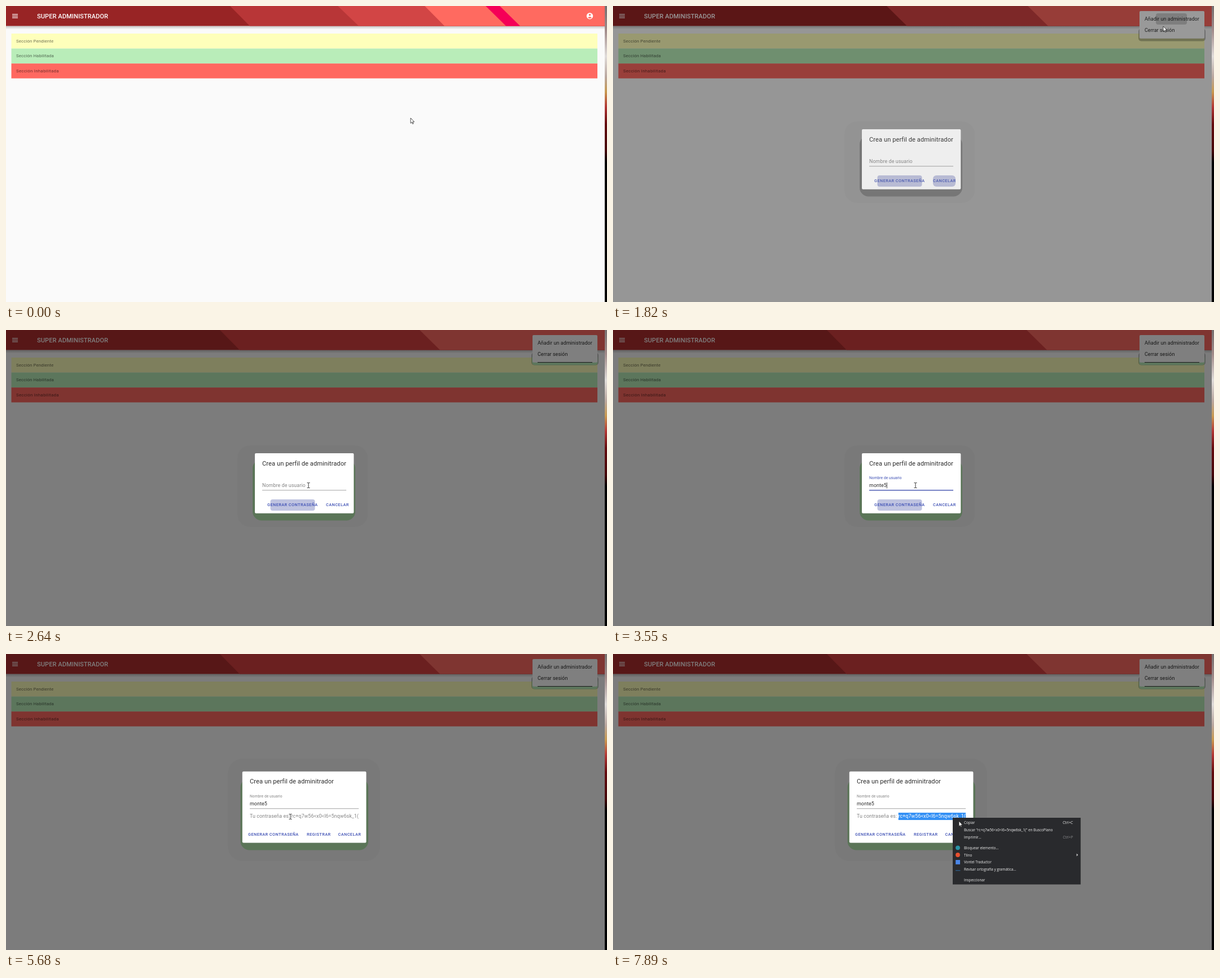
Recreate the animation shown at these times as an HTML page. Size 1065 by 526 pixels, loop 7990 ms.

```html
<!DOCTYPE html>
<html lang="es">
<head>
<meta charset="utf-8">
<title>Panel de administración</title>
<style>
html, body { margin: 0; width: 100%; height: 100%; overflow: hidden; background: #fafafa; }
svg { display: block; width: 1065px; height: 526px; font: 8.88px Roboto, sans-serif; letter-spacing: .083px; }

.title { font-size: 11.1px; font-weight: 500; letter-spacing: .05px; fill: #fff; }
.row { font-size: 7.77px; letter-spacing: .13px; fill: #000; fill-opacity: .56; }
.wide { letter-spacing: .3px; }
.ink { fill: #2b2b2b; }
.soft { fill: #858585; }
.head { font-size: 11.1px; letter-spacing: .08px; fill: #2b2b2b; }
.small { font-size: 6.66px; letter-spacing: .06px; }
.btn { font-size: 7.3px; font-weight: 500; letter-spacing: .45px; fill: #3f51b5; }
.blue { fill: #3f51b5; }
.glow { fill: #bfc3e0; }
.ctx { font: 6.3px "Open Sans", sans-serif; letter-spacing: 0; fill: #f1f1f1; }
.key { text-anchor: end; fill: #8d8e90; }

/* One shared loop; every track changes in hard steps. */
.a { animation: 7990ms step-end infinite both; }
.lit { animation-name: lit; }
.mid { animation-name: mid; }
.dim { animation-name: dim; }
.scrim { animation-name: scrim; }
.menu { animation-name: menu; transform-origin: 1040px 12px; }
.pink { animation-name: pink; }
.hover { animation-name: hover; }
.press { animation-name: mid; }
.rule { animation-name: rule; }
.ask { animation-name: ask; }
.result { animation-name: result; }
.shade { animation-name: shade; }
.cancel { animation-name: cancel; }
.idle { animation-name: idle; }
.focus { animation-name: focus; }
.bar { animation-name: bar; transform-origin: 528.5px 284px; }
.typed tspan { animation-name: typed; animation-delay: calc(var(--i) * 101ms); }
.caret { animation-name: caret; }
.sel { animation-name: sel; transform-origin: 505.5px 288px; }
.context { animation-name: context; }
.copy { animation-name: copy; }
.pointer { animation-name: move; }
.arrow { animation-name: arrow; }
.beam { animation-name: beam; }

@keyframes lit { 0% { opacity: 1 } 22.7%, 100% { opacity: 0 } }
@keyframes mid { 0% { opacity: 0 } 22.7% { opacity: 1 } 24%, 100% { opacity: 0 } }
@keyframes dim { 0% { opacity: 0 } 24%, 100% { opacity: 1 } }
@keyframes scrim { 0% { opacity: 0 } 22.7% { opacity: .4 } 24%, 100% { opacity: .5 } }
@keyframes menu {
  0% { opacity: 0; transform: scale(.4) }
  16.5% { opacity: .6; transform: scale(.7) }
  17.7%, 100% { opacity: 1; transform: none }
}
@keyframes pink { 0% { opacity: 0 } 17.7% { opacity: 1 } 22.7%, 100% { opacity: 0 } }
@keyframes hover { 0% { opacity: 0 } 20.2% { opacity: 1 } 22.7%, 100% { opacity: 0 } }
@keyframes rule { 0% { opacity: 0 } 33%, 100% { opacity: 1 } }
@keyframes ask { 0% { opacity: 0 } 22.7% { opacity: .84 } 24% { opacity: 1 } 59.4%, 100% { opacity: 0 } }
@keyframes result { 0% { opacity: 0 } 59.4%, 100% { opacity: 1 } }
@keyframes shade { 0% { fill: #707070 } 24%, 100% { fill: #5b7558 } }
@keyframes cancel { 0% { opacity: 1 } 27.8%, 100% { opacity: 0 } }
@keyframes idle { 0% { opacity: 1 } 35.5%, 100% { opacity: 0 } }
@keyframes focus { 0% { opacity: 0 } 35.5%, 100% { opacity: 1 } }
@keyframes bar {
  0% { transform: scaleX(0) }
  35.5% { transform: scaleX(.3) }
  36.7% { transform: scaleX(.8) }
  38%, 100% { transform: none }
}
@keyframes typed { 0% { opacity: 0; visibility: hidden } 38%, 100% { opacity: 1; visibility: visible } }
@keyframes caret {
  0% { opacity: 0; transform: none }
  35.5% { opacity: 1; transform: none }
  38% { opacity: 1; transform: translateX(7.9px) }
  39.3% { opacity: 1; transform: translateX(13px) }
  40.5% { opacity: 1; transform: translateX(18px) }
  41.8% { opacity: 1; transform: translateX(21px) }
  43.1% { opacity: 1; transform: translateX(25.8px) }
  44.3% { opacity: 1; transform: translateX(30.9px) }
  50.6%, 100% { opacity: 0; transform: translateX(30.9px) }
}
@keyframes sel {
  0% { transform: scaleX(0) }
  75.9% { transform: scaleX(0); animation-timing-function: steps(8) }
  86.2%, 100% { transform: scaleX(1) }
}
@keyframes context { 0% { opacity: 0 } 92.4%, 100% { opacity: 1 } }
@keyframes copy { 0% { fill: #8d8e90 } 97.4%, 100% { fill: #f1f1f1 } }
@keyframes move {
  0% { transform: translate(717px, 199px) }
  3.6% { transform: translate(717px, 199px); animation-timing-function: steps(8) }
  14% { transform: translate(1036px, 13px) }
  17.7% { transform: translate(1036px, 13px); animation-timing-function: steps(3) }
  21.5% { transform: translate(986px, 31px) }
  22.7% { transform: translate(975px, 36px) }
  24% { transform: translate(652px, 167px); animation-timing-function: steps(7) }
  33% { transform: translate(536px, 276px) }
  45.6% { transform: translate(536px, 276px); animation-timing-function: steps(7) }
  54.4% { transform: translate(505px, 310px) }
  59.4% { transform: translate(505px, 310px); animation-timing-function: steps(4) }
  64.7% { transform: translate(559px, 284px); animation-timing-function: steps(5) }
  71% { transform: translate(504px, 289px) }
  75.9% { transform: translate(504px, 289px); animation-timing-function: steps(8) }
  86.2% { transform: translate(627px, 287px) }
  87.4% { transform: translate(623px, 287px) }
  89.9% { transform: translate(610px, 274px) }
  91.2% { transform: translate(602px, 291px) }
  93.7% { transform: translate(606px, 294px) }
  94.9% { transform: translate(609px, 296px) }
  97.4% { transform: translate(612px, 296px) }
  98.7%, 100% { transform: translate(613px, 297px) }
}
@keyframes arrow { 0% { opacity: 1 } 33% { opacity: 0 } 49% { opacity: 1 } 64.7% { opacity: 0 } 91.2%, 100% { opacity: 1 } }
@keyframes beam { 0% { opacity: 0 } 33% { opacity: 1 } 49% { opacity: 0 } 64.7% { opacity: 1 } 91.2%, 100% { opacity: 0 } }
</style>
</head>
<body>
<svg viewBox="0 0 1065 526">
  <defs>
    <linearGradient id="wall" x2="0" y2="1">
      <stop offset="0" stop-color="#77706f"/>
      <stop offset=".08" stop-color="#a08a88"/>
      <stop offset=".17" stop-color="#e0dcda"/>
      <stop offset=".24" stop-color="#b9a79f"/>
      <stop offset=".29" stop-color="#c89a50"/>
      <stop offset=".34" stop-color="#b43a38"/>
      <stop offset=".4" stop-color="#640c0f"/>
      <stop offset=".49" stop-color="#45080a"/>
      <stop offset=".53" stop-color="#000"/>
    </linearGradient>
    <linearGradient id="fall" x2="0" y2="1">
      <stop offset="0" stop-opacity=".22"/>
      <stop offset="1" stop-opacity="0"/>
    </linearGradient>
    <clipPath id="picked"><rect class="a sel" x="505.5" y="282" width="120" height="13"/></clipPath>
    <clipPath id="field"><rect x="432" y="278" width="193.5" height="20"/></clipPath>
  </defs>

  <rect width="1061" height="526" fill="#fafafa"/>
  <rect y="35.5" width="1061" height="6" fill="url(#fall)"/>

  <!-- Header bands -->
  <g class="a lit">
    <path fill="#982425" d="M0 0H1061V35.5H0z"/>
    <path fill="#b83637" d="M397 0H1061V35.5H432z"/>
    <path fill="#d24545" d="M588 0H1061V35.5H625z"/>
    <path fill="#ff6a60" d="M742 0H1061V35.5H777z"/>
    <path fill="#f50057" d="M850 0H875L911 35.5H886z"/>
  </g>
  <g class="a mid">
    <path fill="#982425" d="M0 0H1061V35.5H0z"/>
    <path fill="#d04343" d="M485 0H1061V35.5H521z"/>
    <path fill="#fb665d" d="M735 0H1061V35.5H771z"/>
  </g>
  <g class="a dim">
    <path fill="#b02e2e" d="M0 0H1061V35.5H0z"/>
    <path fill="#d84040" d="M379 0H1061V35.5H414z"/>
    <path fill="#ff6a62" d="M733 0H1061V35.5H769z"/>
  </g>
  <path fill="#fff" d="M11 14.2h10v1.2h-10zM11 17.2h10v1.2h-10zM11 20.2h10v1.2h-10z"/>
  <text class="title" x="55" y="21.8">SUPER ADMINISTRADOR</text>
  <circle cx="1034.5" cy="17.8" r="5.7" fill="#fff"/>
  <circle cx="1034.5" cy="15.7" r="1.8" fill="#ff6a60"/>
  <path fill="#ff6a60" d="M1031 20.6q3.5-2.8 7 0q-3.5 3.4-7 0z"/>

  <!-- Sections -->
  <rect x="9.5" y="49" width="1038.5" height="26.6" fill="#feffbb"/>
  <rect x="9.5" y="75.6" width="1038.5" height="26.6" fill="#b9edb9"/>
  <rect x="9.5" y="102.2" width="1038.5" height="26.4" fill="#ff6860"/>
  <text class="row" x="18" y="64.6">Sección Pendiente</text>
  <text class="row" x="18" y="91.2">Sección Habilitada</text>
  <text class="row wide" x="18" y="117.8">Sección Inhabilitada</text>

  <!-- Account menu -->
  <path class="a pink" fill="none" stroke="#f50057" stroke-width="2" d="M929 35V15Q929 8.5 936 8.5H1045Q1051 8.5 1051 15V35"/>
  <g class="a menu">
    <rect x="931" y="40" width="119" height="22.5" rx="5" fill-opacity=".26"/>
    <rect class="a dim" x="932" y="45" width="116.5" height="17.5" rx="5" fill="#b9edb9"/>
    <rect x="933" y="9" width="115" height="48.7" rx="2" fill="#fff"/>
    <rect class="a hover" x="933" y="13" width="115" height="20" fill="#f2f2f2"/>
    <rect class="a press" x="962" y="13" width="55" height="20" rx="4" fill="#d2d2d2"/>
    <text class="ink" x="942" y="26">Añadir un administrador</text>
    <text class="ink" x="942" y="46">Cerrar sesión</text>
    <rect class="a rule" x="942" y="57" width="97" height="1" fill="#333"/>
  </g>

  <rect class="a scrim" width="1061" height="526"/>

  <!-- Profile form -->
  <g class="a ask">
    <rect x="410" y="205" width="231" height="145" rx="22" fill-opacity=".02"/>
    <rect class="a shade" x="437" y="230" width="182" height="108.5" rx="16"/>
    <rect x="441" y="219" width="175.3" height="106.7" rx="2" fill="#fff"/>
    <text class="head" x="454" y="240.6">Crea un perfil de adminitrador</text>
    <rect x="454" y="284.4" width="149" height=".8" fill="#8c8c8c"/>
    <text class="a idle soft" x="454" y="279.2">Nombre de usuario</text>
    <g class="a focus">
      <text class="small blue" x="454" y="264.6">Nombre de usuario</text>
      <rect class="a bar blue" x="454" y="284" width="149" height="1.3"/>
      <text class="typed ink" x="454" y="279.2"><tspan class="a" style="--i:0">m</tspan><tspan class="a" style="--i:1">o</tspan><tspan class="a" style="--i:2">n</tspan><tspan class="a" style="--i:3">t</tspan><tspan class="a" style="--i:4">e</tspan><tspan class="a" style="--i:5">5</tspan></text>
      <rect class="a caret" x="454" y="271" width=".8" height="10.5" fill="#222"/>
    </g>
    <rect class="glow" x="468.5" y="301" width="79" height="20" rx="4"/>
    <rect class="a cancel glow" x="567" y="301" width="40" height="20" rx="6"/>
    <text class="btn" x="463" y="313.2">GENERAR CONTRASEÑA</text>
    <text class="btn" x="567" y="313.2">CANCELAR</text>
  </g>

  <!-- Generated password -->
  <g class="a result">
    <rect x="393" y="186" width="270" height="182" rx="26" fill-opacity=".02"/>
    <rect x="415.5" y="221" width="226.5" height="127.5" rx="16" fill="#5b7558"/>
    <rect x="418.8" y="208.8" width="219.6" height="126.8" rx="2" fill="#fff"/>
    <text class="head" x="432" y="230.4">Crea un perfil de adminitrador</text>
    <text class="small soft" x="432" y="254.6">Nombre de usuario</text>
    <text class="ink" x="432" y="269.2">monte5</text>
    <rect x="432" y="274.4" width="193" height=".8" fill="#8c8c8c"/>
    <g clip-path="url(#field)">
      <text class="soft" x="432" y="291.4">Tu contraseña es: rc+q7w56&lt;x0&lt;l6=5nqw6sk_1(</text>
      <g clip-path="url(#picked)">
        <rect x="505.5" y="282" width="120" height="13" fill="#3390f5"/>
        <text fill="#fff" x="432" y="291.4">Tu contraseña es: rc+q7w56&lt;x0&lt;l6=5nqw6sk_1(</text>
      </g>
    </g>
    <text class="btn" x="429" y="323">GENERAR CONTRASEÑA</text>
    <text class="btn" x="533" y="323">REGISTRAR</text>
    <text class="btn" x="588.5" y="323">CANCELAR</text>
  </g>

  <!-- Context menu -->
  <g class="a context ctx">
    <rect x="602" y="291" width="226.7" height="118.5" fill="#292a2d"/>
    <text x="622" y="302.3">Copiar</text>
    <text class="a copy key" x="815" y="302.3">Ctrl+C</text>
    <text x="622" y="315.1">Buscar "rc+q7w56&lt;x0&lt;l6=5nqw6sk_1(" en BuscoPlano</text>
    <text x="622" y="327.9">Imprimir...</text>
    <text class="key" x="815" y="327.9">Ctrl+P</text>
    <text x="622" y="346.7">Bloquear elemento...</text>
    <text x="622" y="359.5">Tilno</text>
    <text x="622" y="372.3">Vontel Traductor</text>
    <text x="622" y="385.1">Revisar ortografía y gramática...</text>
    <text x="622" y="403.9">Inspeccionar</text>
    <path fill="#c8c8c8" d="M821.5 354.6l2.6 2.4-2.6 2.4z"/>
    <circle cx="611" cy="344.3" r="3.9" fill="#2a93a5"/>
    <circle cx="611" cy="357" r="3.9" fill="#e8502f"/>
    <rect x="607.2" y="366" width="7.8" height="7.8" fill="#4a86e8"/>
    <path fill="none" stroke="#2f6fa8" d="M607 384.8h8.4"/>
  </g>

  <rect x="1061" width="4" height="526" fill="url(#wall)"/>

  <g class="a pointer">
    <path class="a arrow" fill="#fff" stroke="#222" stroke-width=".8" d="M0 0V9.4L2.2 7.4 3.7 10.6 5 10 3.6 6.9H6.5z"/>
    <path class="a beam" fill="none" stroke="#222" stroke-width=".9" d="M-2.5-4.5H-.7L0-4 .7-4.5H2.5M0-4V4M-2.5 4.5H-.7L0 4 .7 4.5H2.5"/>
  </g>
</svg>
</body>
</html>
```
